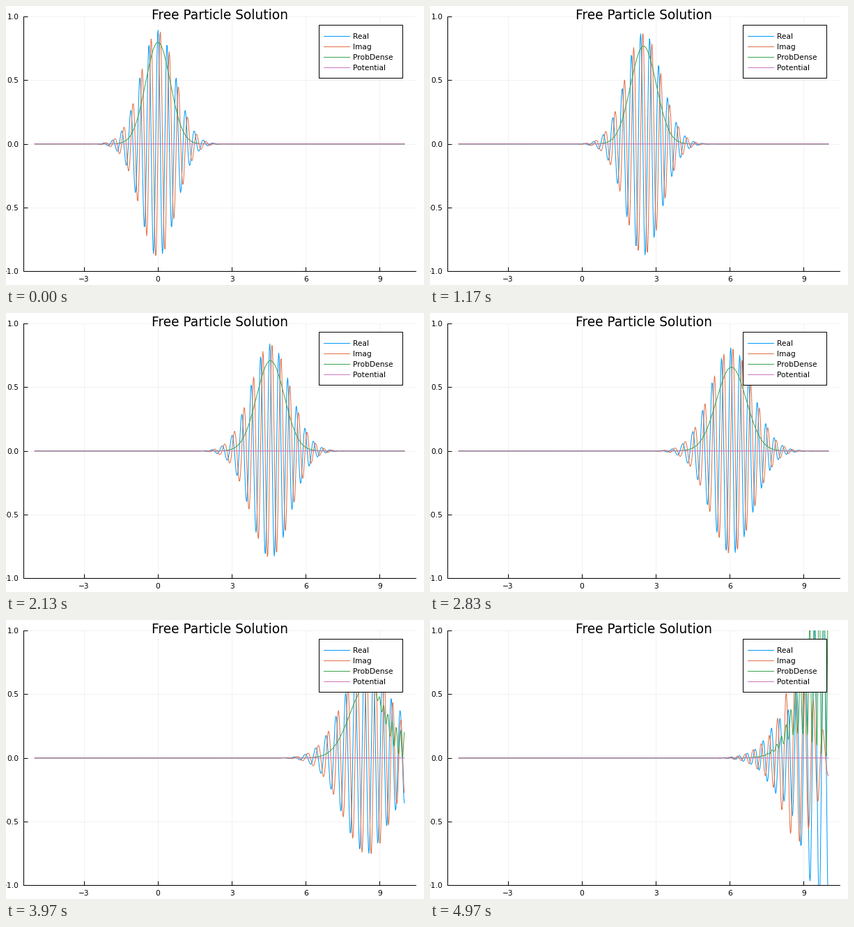
Animation, 600 px wide and 400 px high, one loop 5010 ms. Source, as a matplotlib script:

```python
import numpy as np
import matplotlib.pyplot as plt
from matplotlib.animation import FuncAnimation
from matplotlib.patches import Rectangle

W, H = 600, 400
LOOP_MS, TICK_MS = 5010, 15
STEPS, STEPS_PER_MS = 150, 0.03
PX = 0.72  # points per pixel at 100 dpi

BLUE, ORANGE, GREEN, PINK = "#009afa", "#e26f46", "#3da44d", "#cc77bd"

# Free wave packet on a lattice with reflecting ends (cosine modes)
K0 = 17.0
DX = 0.02
DT = 0.00428
N = 751
x = -5 + DX * np.arange(N)
psi0 = (2 / np.pi) ** 0.25 * np.exp(-x**2 + 1j * K0 * x)

n = np.arange(N)
modes = np.sqrt(2 / N) * np.cos(np.pi * np.outer(n + 0.5, n) / N)
modes[:, 0] /= np.sqrt(2)
energy = (1 - np.cos(np.pi * n / N)) / DX**2
phases = np.exp(-1j * DT * np.outer(energy, np.arange(STEPS)))
waves = (modes @ (phases * (modes.T @ psi0)[:, None])).T

plt.rcParams["font.family"] = "DejaVu Sans"
fig = plt.figure(figsize=(W / 100, H / 100), dpi=100, facecolor="white")

# Plot area
left, right, top, bottom = 25.47, 587.7, 15.2, 380.3
ax = fig.add_axes([left / W, 1 - bottom / H, (right - left) / W, (bottom - top) / H])
ax.set_xlim(-5.45, 10.45)
ax.set_ylim(-1, 1)
ax.patch.set_visible(False)
ax.set_axisbelow(True)
ax.set_xticks([-3, 0, 3, 6, 9])
ax.set_yticks([-1, -0.5, 0, 0.5, 1], ["−1.0", "−0.5", "0.0", "0.5", "1.0"])
ax.grid(color="black", alpha=0.1, linewidth=0.5 * PX)
ax.spines[["top", "right"]].set_visible(False)
ax.spines[["left", "bottom"]].set_linewidth(PX)
ax.tick_params(direction="in", length=6 * PX, width=PX, labelsize=10.67 * PX)
ax.tick_params(axis="x", pad=6.4 * PX)
ax.tick_params(axis="y", pad=7 * PX)


def curve(color):
    return ax.plot(x, 0 * x, color=color, linewidth=PX, zorder=3, snap=False)[0]


real, imag, prob, potential = map(curve, (BLUE, ORANGE, GREEN, PINK))

fig.text(306.6 / W, 1 - 18.7 / H, "Free Particle Solution",
         fontsize=18.67 * PX, ha="center", va="baseline")

# Legend, laid out in pixels
key = fig.add_axes([0, 0, 1, 1], zorder=5)
key.set_xlim(0, W)
key.set_ylim(H, 0)
key.axis("off")
key.add_patch(Rectangle((449.2, 27.2), 120, 76, facecolor="white",
                        edgecolor="black", linewidth=PX))
entries = [("Real", BLUE), ("Imag", ORANGE), ("ProbDense", GREEN), ("Potential", PINK)]
for row, (label, color) in enumerate(entries):
    y = 43 + 15.1 * row
    key.plot([456, 493.4], [y, y], color=color, linewidth=PX)
    key.text(498.3, y + 4.1, label, fontsize=10.67 * PX, va="baseline")


def update(tick):
    # The picture holds for about two ticks per simulation step
    step = int((tick + 1) * TICK_MS * STEPS_PER_MS)
    psi = waves[min(step, STEPS - 1)]
    real.set_ydata(psi.real)
    imag.set_ydata(psi.imag)
    prob.set_ydata(np.abs(psi) ** 2)
    return real, imag, prob


anim = FuncAnimation(fig, update, frames=LOOP_MS // TICK_MS, interval=TICK_MS,
                     repeat=True, repeat_delay=0, blit=False)
plt.show()
```
